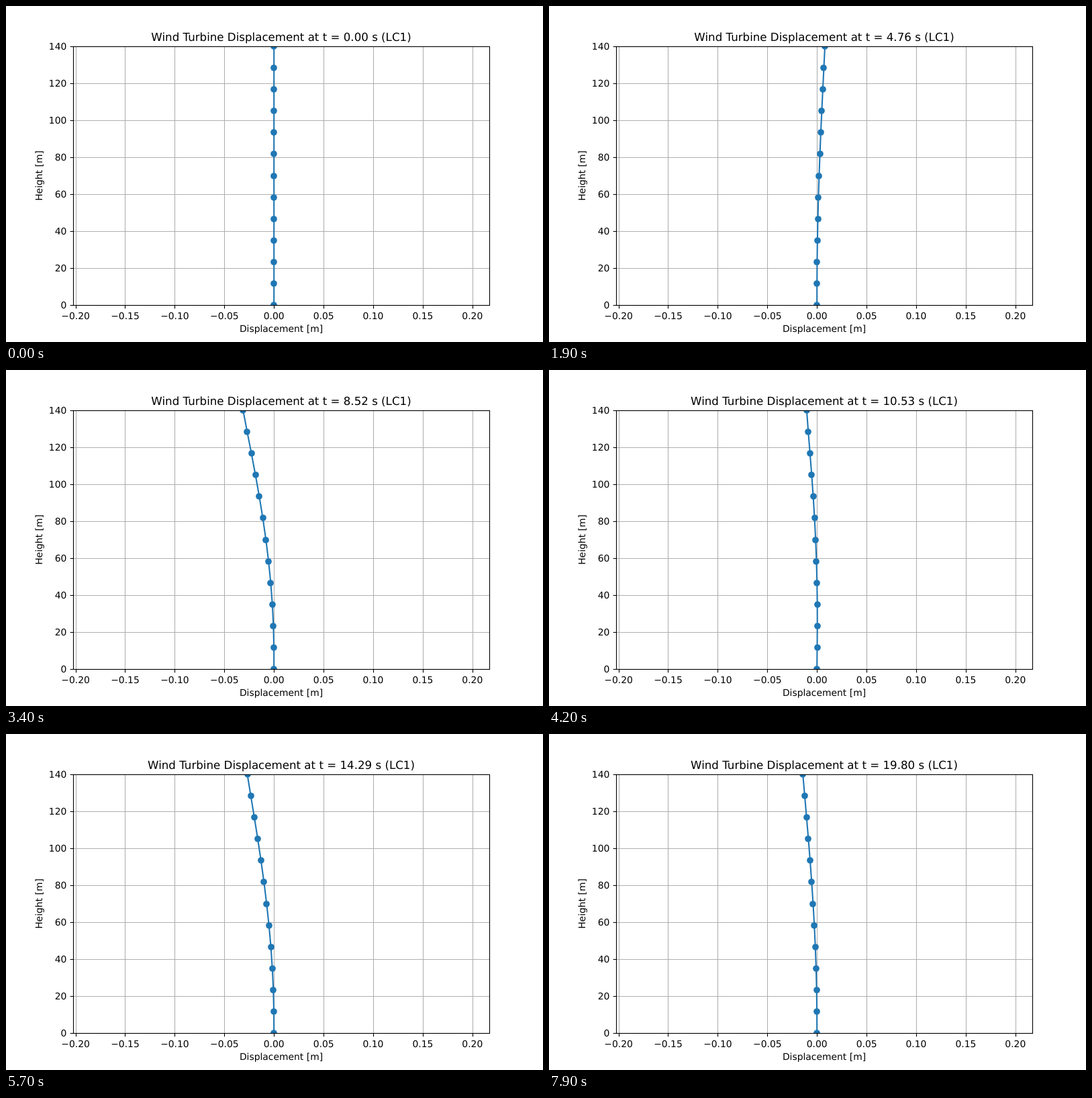
An HTML page that plays this animation: 800 px wide and 500 px high, repeating every 8000 ms.

```html
<!DOCTYPE html>
<html lang="en">
<head>
<meta charset="utf-8">
<title>Tower displacement</title>
<style>
  html, body { margin: 0; width: 100%; height: 100%; overflow: hidden; background: #fff; }
  svg { display: block; }
  text { font: 13.889px "DejaVu Sans", sans-serif; text-anchor: middle; text-rendering: geometricPrecision; }
  #title { font-size: 16.667px; }
  .end { text-anchor: end; }
  .grid { stroke: #b0b0b0; stroke-width: 1.11; }
  .axis { stroke: #000; stroke-width: 1.11; fill: none; }
  #tower { stroke: #1f77b4; stroke-width: 2.08; fill: none; stroke-linejoin: round; }
  #nodes { fill: #1f77b4; }
</style>
</head>
<body>
<svg width="800" height="500" viewBox="0 0 800 500">
  <clipPath id="plot"><rect x="100" y="60" width="620" height="385"/></clipPath>
  <g id="grid"></g>
  <g clip-path="url(#plot)"><path id="tower"/><g id="nodes"></g></g>
  <rect class="axis" x="100.5" y="60.5" width="620" height="385"/>
  <g id="labels"></g>
  <text id="title" x="410" y="52"></text>
  <text x="410" y="485">Displacement [m]</text>
  <text transform="translate(54 252.5) rotate(-90)">Height [m]</text>
</svg>
<script>
const FRAME_MS = 100, FRAMES = 80, STEP_S = 100 / 399;
const ZERO_X = 399.2, BASE_Y = 445, HEIGHT = 385, SEGMENTS = 12;

// [frame, pixels]: sway of the tip, and bulge at mid height
const SWAY = [[0, 0], [5, 8], [9, -11], [12, -23], [18, 16], [23, -24], [26, -1],
  [29, 28], [34, -46], [39, 22], [42, -15.3], [46, -30], [51, 30], [56, -45],
  [57, -39.7], [64, 54], [65, 51], [72, -43], [76, 30], [79, -21]];
const BULGE = [[0, 0], [11, -2.4], [26, 1.5], [42, 2.8], [57, 1.5], [65, 1], [79, 0.8]];

const $ = id => document.getElementById(id);

function add(parent, tag, attrs, text = '') {
  const el = document.createElementNS('http://www.w3.org/2000/svg', tag);
  for (const key in attrs) el.setAttribute(key, attrs[key]);
  el.textContent = text;
  return $(parent).appendChild(el);
}

function line(cls, x1, y1, x2, y2) {
  add('grid', 'line', { class: cls, x1, y1, x2, y2 });
}

// Cubic interpolation with level tangents at the extremes
function sample(keys, t) {
  let i = 0;
  while (i < keys.length - 2 && t > keys[i + 1][0]) i++;
  const secant = j => keys[j] && keys[j + 1]
    ? (keys[j + 1][1] - keys[j][1]) / (keys[j + 1][0] - keys[j][0]) : 0;
  const tangent = j => {
    const a = secant(j - 1), b = secant(j);
    return a * b > 0 ? 2 * a * b / (a + b) : 0;
  };
  const [t0, v0] = keys[i], [t1, v1] = keys[i + 1];
  const span = t1 - t0, u = (t - t0) / span, w = 1 - u;
  return w * w * ((1 + 2 * u) * v0 + u * span * tangent(i))
    + u * u * ((3 - 2 * u) * v1 - w * span * tangent(i + 1));
}

for (let i = -4; i <= 4; i++) {
  const x = ZERO_X + i * 73.9, px = Math.round(x) + 0.5;
  line('grid', px, 60, px, 445);
  line('axis', px, 445.5, px, 450.4);
  add('labels', 'text', { x, y: 466 }, (i < 0 ? '\u2212' : '') + Math.abs(i * 0.05).toFixed(2));
}
for (let i = 0; i <= 7; i++) {
  const y = BASE_Y - i * 55;
  line('grid', 100, y + 0.5, 720, y + 0.5);
  line('axis', 95.6, y + 0.5, 100.5, y + 0.5);
  add('labels', 'text', { class: 'end', x: 90.3, y: y + 5 }, i * 20);
}

const nodes = Array.from({ length: SEGMENTS + 1 }, () => add('nodes', 'circle', { r: 4.86 }));

function render(ms) {
  const frame = Math.floor(ms / FRAME_MS) % FRAMES;
  const sway = sample(SWAY, frame), bulge = sample(BULGE, frame);
  const points = nodes.map((node, k) => {
    const s = k / SEGMENTS;
    const x = ZERO_X + sway * s * s * (3 - s) / 2 + bulge * 8 * (s * (1 - s)) ** 1.5;
    const y = BASE_Y - s * HEIGHT;
    node.setAttribute('cx', Math.round(x));
    node.setAttribute('cy', Math.round(y));
    return x.toFixed(2) + ' ' + y.toFixed(2);
  });
  $('tower').setAttribute('d', 'M' + points.join('L'));
  $('title').textContent =
    `Wind Turbine Displacement at t = ${(frame * STEP_S).toFixed(2)} s (LC1)`;
}

const start = performance.now();
function tick() {
  render(performance.now() - start);
  requestAnimationFrame(tick);
}
tick();
</script>
</body>
</html>
```
